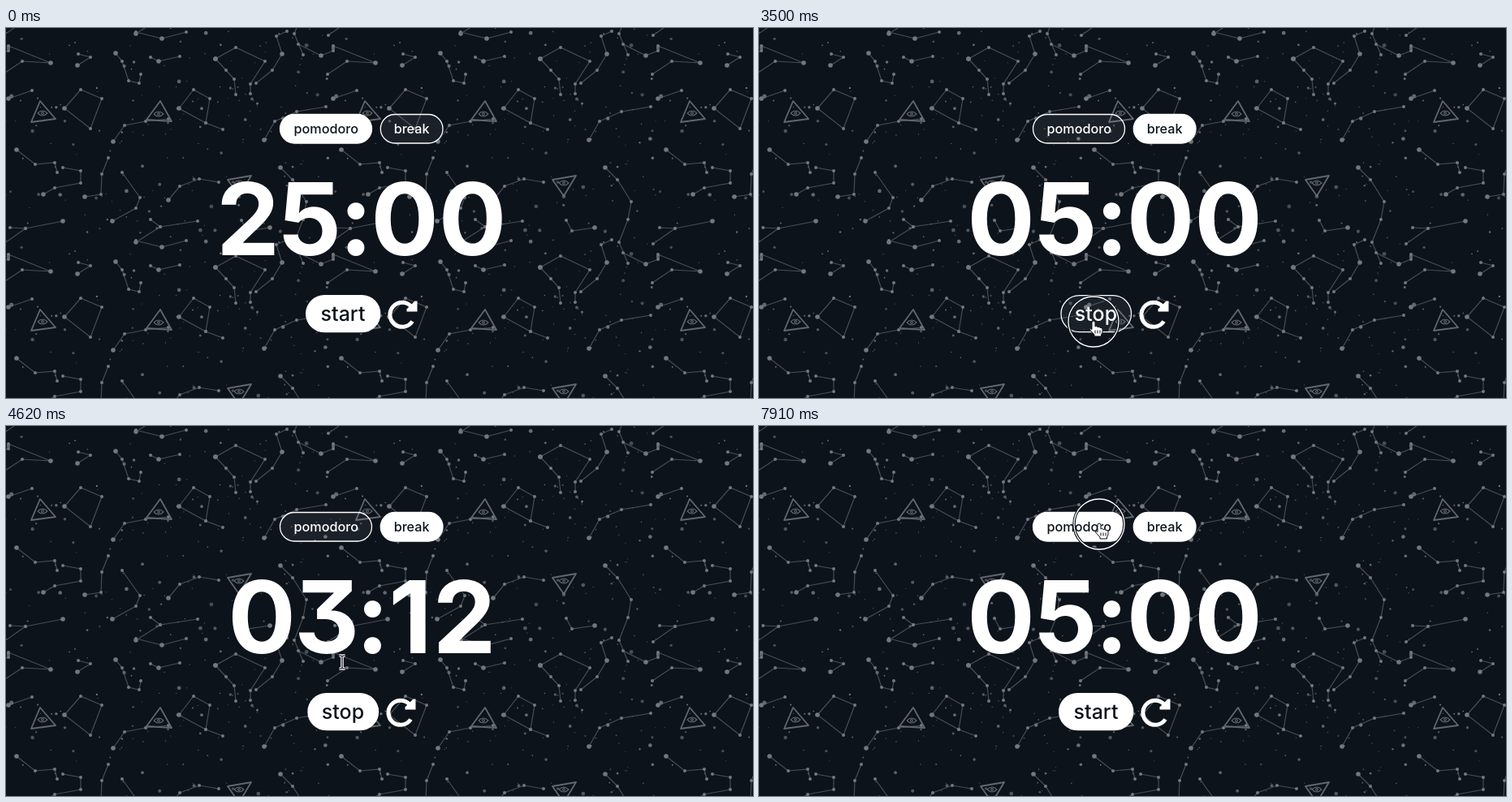
An HTML page for the animation above (8 s loop, 920 px wide and 456 px high).

```html
<!DOCTYPE html>
<html lang="en">
<head>
<meta charset="utf-8">
<title>Pomodoro timer</title>
<style>
html, body { margin: 0; width: 100%; height: 100%; overflow: hidden; background: #0d131b; }
svg { display: block; width: 920px; height: 456px; }
text { font-family: Inter, sans-serif; text-anchor: middle; fill: #fff; }
#clock { font-size: 124px; font-weight: 650; font-feature-settings: "cv09", "calt" 0; }
.tab text { font-size: 16.2px; font-weight: 450; }
#go text { font-size: 25px; font-weight: 550; }
.pill { fill: #fff; stroke: #fff; stroke-width: 1.3; }
.line { fill: none; stroke: #484d54; stroke-width: 1.2; marker-start: url(#big); marker-mid: url(#dot); marker-end: url(#dot); }
.eye { fill: none; stroke: #62676d; stroke-width: 1.8; stroke-linejoin: round; }
.eye .thin { stroke-width: 1.1; }
.star { fill: #74787e; }
</style>
</head>
<body>
<svg viewBox="0 0 920 456">
  <defs>
    <marker id="dot" markerUnits="userSpaceOnUse" markerWidth="6" markerHeight="6" refX="3" refY="3"><circle class="star" cx="3" cy="3" r="2"/></marker>
    <marker id="big" markerUnits="userSpaceOnUse" markerWidth="6" markerHeight="6" refX="3" refY="3"><circle class="star" cx="3" cy="3" r="2.8"/></marker>
    <g id="tile"></g>
  </defs>
  <rect width="920" height="456" fill="#0d131b"/>
  <g id="sky"></g>

  <g id="pom" class="tab">
    <rect class="pill" x="337.5" y="106.5" width="113" height="35.5" rx="17.75"/>
    <text x="394.3" y="130">pomodoro</text>
  </g>
  <g id="brk" class="tab">
    <rect class="pill" x="461.3" y="106.5" width="76.7" height="35.5" rx="17.75"/>
    <text x="499.6" y="130">break</text>
  </g>
  <text id="clock" y="280"></text>
  <g id="go">
    <rect class="pill" y="329.7" height="45" rx="22.5"/>
    <text x="415" y="361"></text>
  </g>
  <g id="redo">
    <path d="M499 343.2A15 15 0 1 0 500.5 361.5" fill="none" stroke="#fff" stroke-width="5"/>
    <path d="M503.5 336.5L506.5 336.5V349.5H493.5V346.5Z" fill="#fff"/>
  </g>

  <g id="ring" fill="none">
    <circle stroke="#0d131b" stroke-width="3.6"/>
    <circle stroke="#fff" stroke-width="1.3"/>
  </g>
  <g id="cursor">
    <path id="arrow" d="M0 0V14.5L3.6 11.2 6.2 17 9 15.8 6.5 10.2H11.2Z" fill="#0d131b" stroke="#fff" stroke-width="1.3"/>
    <g id="hand" stroke="#0d131b" stroke-width="1">
      <path d="M-2 1Q-2-1 0-1T2 1V6Q4 4.500 5 6.500 7 5.500 8 7.500 11 6.500 11 9V12Q11 14 9.500 16V18H1V16L-4.500 10Q-5 7.500-2 9.500Z" fill="#fff"/>
      <path d="M2 10.500v4M5 10.500v4M8 10.500v4"/>
    </g>
    <g id="beam" fill="none">
      <path d="M-3.500-8H-1.500L0-7 1.500-8H3.500M0-7V7M-3.500 8H-1.500L0 7 1.500 8H3.500" stroke="#fff" stroke-width="3.600"/>
      <path d="M-3.500-8H-1.500L0-7 1.500-8H3.500M0-7V7M-3.500 8H-1.500L0 7 1.500 8H3.500" stroke="#0d131b" stroke-width="1.200"/>
    </g>
  </g>
</svg>
<script>
const $ = id => document.getElementById(id);
const set = (el, attrs) => { for (const k in attrs) el.setAttribute(k, attrs[k]); return el; };
const add = (parent, tag, attrs) =>
  parent.appendChild(set(document.createElementNS('http://www.w3.org/2000/svg', tag), attrs));

// Night sky: one 400 x 257 tile, repeated
const W = 400, H = 257, tile = $('tile');
const constellations = [
  'M55 43L20 41-4 57M55 43L3 22',
  'M88 46L104 36 89 32',
  'M135 31L143 41 151 65 164 68 166 57',
  'M192 13L160 5M192 13L222 5',
  'M188 41L178 36M188 41L214 35',
  'M258 38L283 24 319 41 301 69 301 81',
  'M258 38L271 52 281 63 283 82',
  'M340 32L333 10 346 4M340 32L328 52 308 68',
  'M388 34L360 20M388 34L403 28',
  'M3 87L32 77',
  'M72 99L92 76 118 87 104 124Z',
  'M213 99L231 76 251 87 246 117ZM246 117L267 125',
  'M132 140L146 120 172 115 200 112',
  'M318 138L331 115 358 103 394 97',
  'M13 150L36 168 60 166 63 178',
  'M46 205L60 197 92 191 92 176 70 172',
  'M97 208L117 205 118 180 126 160',
  'M131 238L160 222 165 209 143 178',
  'M200 212L214 195 238 186 262 190',
  'M70 238L24 247 5 246M24 247L-3 266',
  'M160 264L190 245 236 238M190 245L178 236',
  'M325 246L297 250 290 237',
  'M338 172L353 187 370 214 366 236 355 264 366 290'
];
constellations.forEach(d => add(tile, 'path', { class: 'line', d }));

function eye(points, x, y) {
  const g = add(tile, 'g', { class: 'eye' });
  add(g, 'polygon', { points });
  add(g, 'path', { class: 'thin', d: `M${x - 6} ${y}q6-6 12 0q-6 6-12 0` });
  add(g, 'circle', { class: 'thin', cx: x, cy: y, r: 1.4 });
}
eye('42,90 31,116 61,112', 45, 105);
eye('190,90 204,115 173,113', 188, 106);
eye('273,187 302,182 287,207', 287, 191);

let seed = 11;
const rand = () => (seed = seed * 16807 % 2147483647) / 2147483647;
for (let i = 0; i < 190; i++)
  add(tile, 'circle', { class: 'star', cx: rand() * W, cy: rand() * H,
    r: 0.6 + 2 * rand() ** 3, opacity: 0.55 + 0.4 * rand() });
for (let x = -1; x < 3; x++)
  for (let y = -1; y < 2; y++)
    add($('sky'), 'use', { href: '#tile', x: x * W, y: y * H });

// Timeline
const LOOP = 8000, STEP = 70;
const clamp = v => Math.max(0, Math.min(1, v));
const ramp = (t, at) => clamp((t - at + STEP) / (3 * STEP));
const level = (t, spans) => spans.reduce((s, [on, off]) => s + ramp(t, on) - ramp(t, off), 0);

const lit = {
  pom: [[-999, 2240], [5110, 6790], [7630, 9999]],
  brk: [[1680, 5320], [6510, 9999]],
  go: [[-999, 3150], [3990, 9999]]
};
const track = [
  [490, 416, 434], [770, 466, 378], [1260, 494, 131], [2170, 494, 131], [2240, 494, 126],
  [2590, 494, 126], [3290, 412, 362], [3500, 412, 362], [3920, 409, 329], [4200, 414, 291],
  [4620, 414, 291], [5040, 398, 142], [5250, 427, 130], [6230, 427, 130], [6600, 493, 119],
  [7280, 493, 119], [7770, 419, 121], [8000, 419, 121]
];
// start, end, x, y, largest radius
const clicks = [
  [1330, 1540, 494, 131, 24], [2240, 2380, 494, 126, 32], [3360, 3570, 412, 362, 32],
  [5180, 5460, 427, 132, 32], [6650, 6860, 493, 119, 32], [7840, 8000, 419, 121, 32]
];
const advance = { 0: 83.5, 1: 56.5, 2: 76.5, 3: 76.5, 4: 79.5, 5: 76.5, 6: 80, 7: 70, 8: 80, 9: 80.5, ':': 36.5 };

function pointer(t) {
  const i = track.findIndex(k => k[0] > t);
  if (i < 1) return null;
  const [t0, x0, y0] = track[i - 1], [t1, x1, y1] = track[i];
  const u = (t - t0) / (t1 - t0), e = u * u * (3 - 2 * u);
  return [x0 + (x1 - x0) * e, y0 + (y1 - y0) * e];
}

function shape([x, y]) {
  const within = (a, b, c, d) => x >= a && x < b && y >= c && y < d;
  if (within(337, 451, 106, 142) || within(461, 538, 106, 142) ||
      within(369, 461, 329, 375) || within(471, 507, 335, 371)) return 'hand';
  return within(262, 614, 180, 302) ? 'beam' : 'arrow';
}

function paint(id, p) {
  const [rect, label] = $(id).children;
  rect.setAttribute('fill-opacity', 0.06 + 0.94 * p);
  const c = [13, 19, 27].map(v => Math.round(255 + (v - 255) * p));
  label.style.fill = `rgb(${c})`;
}

function showTime(secs) {
  const two = n => String(n).padStart(2, '0');
  const s = two(Math.floor(secs / 60)) + ':' + two(secs % 60);
  const widths = [...s].map(c => advance[c]);
  let x = 438 - widths.reduce((a, b) => a + b) / 2;
  const xs = widths.map(w => (x += w) - w / 2);
  $('clock').textContent = s;
  $('clock').setAttribute('x', xs.join(' '));
}

function render(t) {
  const running = t >= 3500 && t < 5320;
  const work = t < 2240 || (t >= 5320 && t < 6790);
  showTime(running ? Math.floor(300 - (t - 3500) * 0.0957) : work ? 1500 : 300);

  for (const id in lit) paint(id, level(t, lit[id]));
  const [rect, label] = $('go').children;
  set(rect, running ? { x: 372, width: 86.5 } : { x: 369.7, width: 91 });
  label.textContent = running ? 'stop' : 'start';
  $('redo').setAttribute('transform', `translate(${running ? -2 : 0} 0)`);

  const at = pointer(t);
  $('cursor').style.display = at ? '' : 'none';
  if (at) {
    $('cursor').setAttribute('transform', `translate(${at})`);
    const kind = shape(at);
    for (const id of ['arrow', 'hand', 'beam']) $(id).style.display = id === kind ? '' : 'none';
  }

  const click = clicks.find(c => t >= c[0] && t < c[1]);
  $('ring').style.display = click ? '' : 'none';
  if (click) {
    const [t0, , cx, cy, max] = click;
    const r = Math.min(max, 16 + (t - t0) / STEP * 16) - 1;
    for (const c of $('ring').children) set(c, { cx, cy, r });
  }
}

let last = -1;
function frame() {
  const t = Math.floor(performance.now() % LOOP / STEP) * STEP;
  if (t !== last) render(last = t);
  requestAnimationFrame(frame);
}
frame();
</script>
</body>
</html>
```
